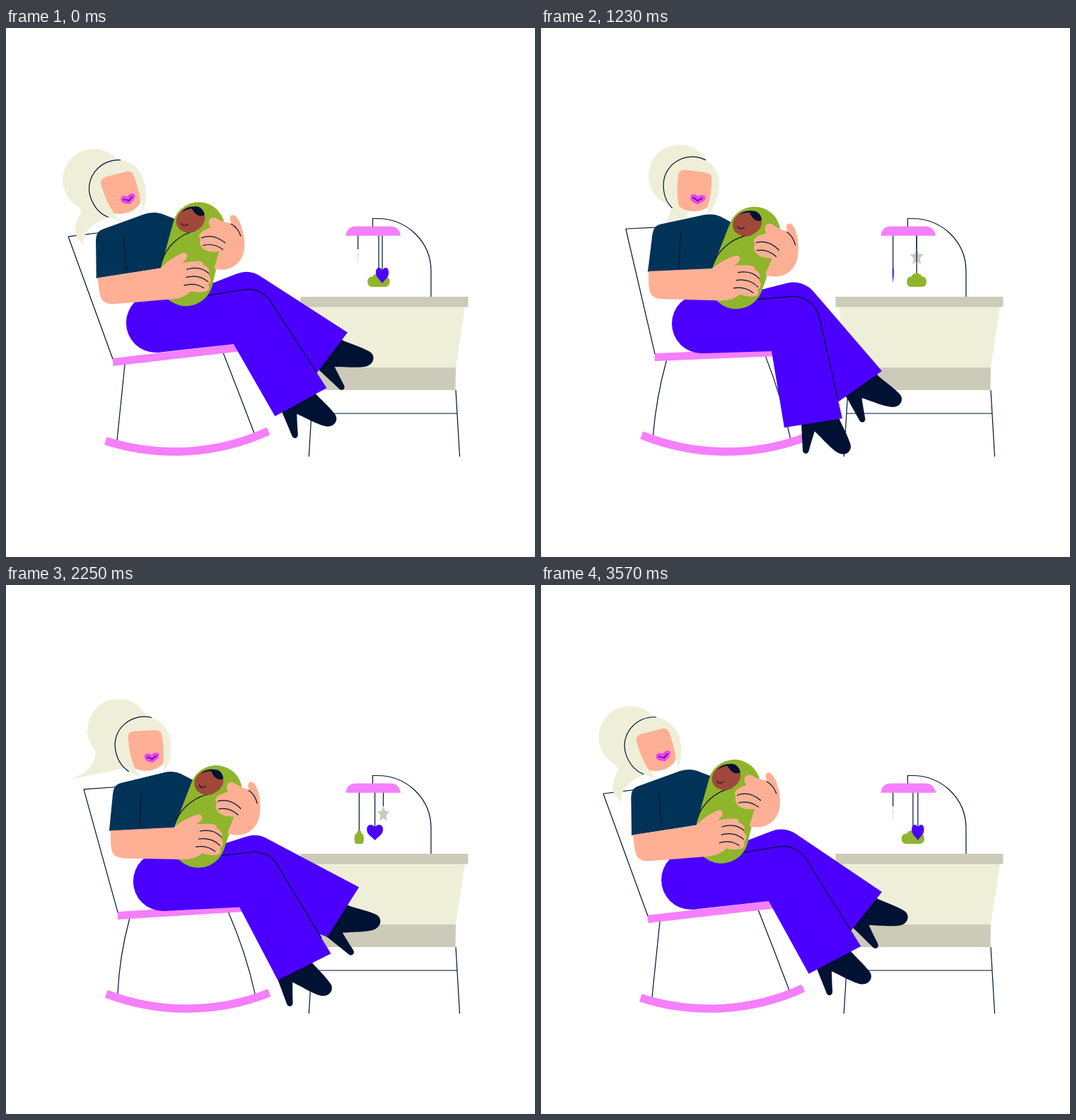
Write an HTML page with a canvas that moves like this. It is 748x748 px and loops after 3600 ms.

```html
<!DOCTYPE html>
<html lang="en">
<head>
<meta charset="utf-8">
<title>Rocking chair</title>
<style>
  html, body { margin: 0; width: 100%; height: 100%; overflow: hidden; background: #fff; }
  canvas { display: block; }
</style>
</head>
<body>
<canvas id="stage" width="748" height="748"></canvas>
<script>
const ctx = document.getElementById('stage').getContext('2d');
const LOOP = 3600, ROCK = 1800, TAU = Math.PI * 2, RAD = Math.PI / 180;
const INK = '#001233', PINK = '#f57fff', VIOLET = '#4b00ff', SHIRT = '#003357', SKIN = '#ffb094',
  CREAM = '#efefd9', STONE = '#cccbb9', GREEN = '#8fb52c', BROWN = '#a0483a', LIPS = '#ee3fff';

// Periodic motion: two harmonics fitted to poses at these moments of one rock.
const MOMENTS = [0, 180, 480, 750, 1230, 1770];
const basis = t => {
  const a = t / ROCK * TAU;
  return [1, Math.cos(a), Math.sin(a), Math.cos(2 * a), Math.sin(2 * a)];
};
const ROWS = MOMENTS.map(basis);

function solve(m, v) {
  const n = v.length, a = m.map((row, i) => [...row, v[i]]);
  for (let i = 0; i < n; i++) {
    const pivot = a[i][i];
    a[i] = a[i].map(x => x / pivot);
    for (let j = 0; j < n; j++) {
      if (j === i) continue;
      const f = a[j][i];
      a[j] = a[j].map((x, k) => x - f * a[i][k]);
    }
  }
  return a.map(row => row[n]);
}

function wave(values) {
  const s = MOMENTS.map((_, i) => values[i] ?? values[0]);
  const dot = (p, q) => ROWS.reduce((sum, r, i) => sum + p(r, i) * q(r, i), 0);
  const normal = ROWS[0].map((_, i) => ROWS[0].map((_, j) =>
    dot(r => r[i], r => r[j]) + (i === j && i > 2 ? 0.15 : 0)));
  const c = solve(normal, ROWS[0].map((_, i) => dot(r => r[i], (_, k) => s[k])));
  return t => basis(t).reduce((sum, b, i) => sum + b * c[i], 0);
}

function point(xs, ys) {
  const x = wave(xs), y = wave(ys);
  return t => [x(t), y(t)];
}

const rig = {
  backTop: point([88, 93, 112, 129, 120], [295, 294, 288, 278, 284]),
  hip: point([212, 213, 223, 231, 227], [417, 418, 419, 415, 418]),
  seatEdge: point([322, 323, 331, 332, 326], [447, 449, 456, 456, 457]),
  farKnee: point([344, 345, 356, 370, 370], [341, 342, 352, 355, 355]),
  farToe: point([483, 489, 500, 502, 482, 482], [431, 418, 430, 455, 485, 434]),
  farHeel: point([440, 445, 455, 447, 421, 439], [487, 488, 499, 517, 528, 488]),
  nearThigh: point([281, 281, 303, 313, 303], [379, 380, 383, 382, 384]),
  nearKnee: point([361, 360, 373, 389, 386], [366, 368, 376, 378, 377]),
  nearToe: point([454, 458, 459, 444, 426, 452], [509, 505, 524, 545, 552, 511]),
  nearHeel: point([381, 387, 383, 363, 344, 378], [549, 549, 560, 565, 565, 550]),
  nearSlide: wave([-12, -22, -24, -17, 0]),
  farSlide: wave([-14, -17, -26, -25, -8]),
  sleeve: point([128, 130, 148, 160, 151], [354, 353, 347, 337, 345]),
  shirtTurn: wave([-6.8, -5, 0, 2.3, 1]),
  arm: point([128, 129, 148, 159, 150], [354, 353.5, 347, 337.5, 344.5]),
  armTurn: wave([-6.3, -6.3, 0, 1.9, -0.3]),
  head: point([164, 169, 203, 229, 217], [232, 232, 232, 222, 229]),
  headTurn: wave([-20, -18.5, -8, 0, 2.5]),
  bun: point([125, 126, 164, 200, 196], [215, 212, 204, 195, 209]),
  tailRoot: point([108, 101, 131, 166, 184], [262, 252, 238, 232, 258]),
  tailOuter: point([90, 82, 131, 156, 178], [289, 280, 262, 250, 272]),
  tailTip: point([112, 92, 92, 135, 177], [307, 302, 271, 235, 280]),
  tailInner: point([108, 96, 125, 140, 183], [278, 278, 268, 258, 276]),
  tailEnd: point([160, 148, 172, 200, 205], [263, 266, 257, 250, 268])
};

function fill(color, shape) {
  ctx.fillStyle = color;
  ctx.fill(typeof shape === 'string' ? new Path2D(shape) : shape);
}

function stroke(shape, color = INK, width = 1.2) {
  ctx.strokeStyle = color;
  ctx.lineWidth = width;
  ctx.stroke(typeof shape === 'string' ? new Path2D(shape) : shape);
}

function group(draw) {
  ctx.save();
  draw();
  ctx.restore();
}

// Turns about the pivot and moves the pivot to the given place.
function place([x, y], degrees, [px, py]) {
  ctx.translate(x, y);
  ctx.rotate(degrees * RAD);
  ctx.translate(-px, -py);
}

function drawCrib() {
  stroke('M434 512 L428.3 606 M636 512 L641.5 606 M431.5 545 H638');
  fill(CREAM, 'M421 394 H649 L636 480 H434 Z');
  fill(STONE, 'M434 480 H636 L635.5 512 H436 Z M416.5 380 H653.5 V394.5 H416.5 Z');
  stroke('M518.5 281 V269.5 H525 C567 269.5 601 302 601 344 V380');
}

const star = 'M' + Array.from({ length: 10 }, (_, i) => {
  const r = i % 2 ? 5.8 : 12.3, a = i * Math.PI / 5;
  return `${r * Math.sin(a)} ${324 - r * Math.cos(a)}`;
}).join('L') + 'Z';
const heart = 'M0 361 C-4 356 -12 353 -11.5 345 C-11 337.5 -3 337 0 343 C3 337 11 337.5 11.5 345 C12 353 4 356 0 361 Z';
const cloud = 'M-10 366 C-19 366 -20 351 -9 351.5 C-7 345 7 345 9 351.5 C20 351 19 366 10 366 Z';
const toys = [
  { shape: star, color: STONE, phase: -88, string: 313 },
  { shape: heart, color: VIOLET, phase: 142, string: 343 },
  { shape: cloud, color: GREEN, phase: 22, string: 349 }
];

function drawMobile(t) {
  const hung = toys.map(toy => ({ ...toy, angle: (toy.phase + t / LOOP * 360) * RAD }));
  hung.sort((a, b) => Math.cos(b.angle) - Math.cos(a.angle));
  for (const { shape, color, string, angle } of hung) group(() => {
    ctx.translate(519 + 21.3 * Math.sin(angle), 0);
    stroke(`M0 293 V${string}`);
    ctx.scale(Math.max(0.06, Math.abs(Math.cos(angle))), 1);
    fill(color, shape);
  });
  fill(PINK, 'M480.5 293.7 C481 286 486 280.5 494 280.5 H544 C552 280.5 557 286 558 293.7 Z');
}

function drawChair(t) {
  const s = 0.5 - 0.5 * Math.cos(t / ROCK * TAU);
  const turn = 6.1 * s, radius = 318, bend = 24 * s * (1 - s);
  const hub = [238 + radius * turn * RAD, 281];
  const a = (turn - 7) * RAD, [x, y] = rig.backTop(t);
  stroke(`M${x + 55 * Math.cos(a)} ${y + 55 * Math.sin(a)} L${x} ${y}`);
  group(() => {
    place(hub, turn, [238, 281]);
    stroke(`M168 476 Q${162.5 - bend} 529 157 583 M307 459 Q${329 + bend} 515 351 573`);
    stroke('M151 472.5 L328 452', PINK, 11);
    const rocker = new Path2D();
    rocker.arc(238, 281, radius, 65.3 * RAD, 107.8 * RAD);
    stroke(rocker, PINK, 11.5);
    const back = new DOMPoint(x, y).matrixTransform(ctx.getTransform().inverse());
    stroke(`M${back.x} ${back.y} L151 468`);
  });
}

const foot = 'M-17 -1 L-21 37 C-20 42.5 -14 42.5 -12 37 C-8 28 -4 20 0 12 C8 22 20 42 29 48 C39 54 49 47 47 37 C45 24 39 8 37 -1 Z';

function drawFoot(toe, heel, slide, drop) {
  group(() => {
    ctx.translate((toe[0] + heel[0]) / 2, (toe[1] + heel[1]) / 2);
    ctx.rotate(Math.atan2(toe[1] - heel[1], toe[0] - heel[0]));
    ctx.translate(slide, drop);
    fill(INK, foot);
    ctx.fillRect(-17, -6, 54, 6);
  });
}

function drawLegs(t) {
  const [hx, hy] = rig.hip(t), edge = rig.seatEdge(t);
  const farKnee = rig.farKnee(t), farToe = rig.farToe(t), farHeel = rig.farHeel(t);
  const thigh = rig.nearThigh(t), knee = rig.nearKnee(t), toe = rig.nearToe(t), heel = rig.nearHeel(t);

  drawFoot(farToe, farHeel, rig.farSlide(t), 3);
  const far = new Path2D();
  far.moveTo(hx + 10, hy - 29);
  far.arcTo(...farKnee, ...farToe, 37);
  for (const p of [farToe, farHeel, edge, [hx, hy]]) far.lineTo(...p);
  fill(VIOLET, far);

  drawFoot(toe, heel, rig.nearSlide(t), 0);
  const near = new Path2D();
  near.moveTo(hx, hy);
  near.lineTo(...thigh);
  near.arcTo(...knee, ...toe, 37);
  for (const p of [toe, heel, edge, [hx + 2, hy + 42]]) near.lineTo(...p);
  fill(VIOLET, near);
  const seat = new Path2D();
  seat.arc(hx, hy, 42, 0, TAU);
  fill(VIOLET, seat);

  const crease = new Path2D();
  crease.moveTo(...thigh);
  crease.arcTo(...knee, ...toe, 37);
  crease.lineTo(...knee.map((k, i) => k + 0.85 * (toe[i] - k)));
  stroke(crease);
}

function drawPonytail(t) {
  const [x, y] = rig.bun(t), root = rig.tailRoot(t), r = 44;
  const hair = new Path2D();
  hair.arc(x, y, r, 0, TAU);
  fill(CREAM, hair);
  const tail = new Path2D();
  tail.moveTo(x, y);
  tail.lineTo(x - r, y);
  tail.bezierCurveTo(x - r, y + 22, root[0], root[1] - 14, ...root);
  tail.quadraticCurveTo(...rig.tailOuter(t), ...rig.tailTip(t));
  tail.quadraticCurveTo(...rig.tailInner(t), ...rig.tailEnd(t));
  tail.lineTo(...rig.head(t));
  fill(CREAM, tail);
}

function drawHead(t) {
  place(rig.head(t), rig.headTurn(t), [229, 222]);
  fill(CREAM, 'M215 260 C200 253 185 235 185 214 C185 190 204 175 225 175 C249 175 265 194 264 217 C263 238 255 250 246 258 C249 252 251 246 251 238 L208 240 C208 248 210 255 215 260 Z');
  fill(SKIN, 'M205 206 C205 197 208 194 215 194 L244 197 C251 198 253 201 253 207 C253 220 252 234 249 245 C242 252 224 257 208 246 C205 233 204 218 205 206 Z');
  stroke('M243 179 C216 167 185 186 185 215 C185 230 190 241 199 249');
  fill(LIPS, 'M224 232 C225 227 231 227 234 231 C238 228 244 228 245 232 C245 237 238 240 234 242 C230 240 223 238 224 232 Z');
  stroke('M227 233 Q231 234 234 237 L241 233');
}

function drawShirt(t) {
  place(rig.sleeve(t), rig.shirtTurn(t), [148, 347]);
  fill(SHIRT, 'M148 347 L153 300 C154 286 157 281 166 279 L226 265 C236 263 243 264 250 267 L290 288 L250 343 Z');
  stroke('M194 290 Q192 310 192 341');
}

function drawBaby() {
  const axis = Math.atan2(69, -26), wrap = new Path2D();
  wrap.arc(300, 293, 37, axis + Math.PI / 2, axis + Math.PI * 1.5);
  wrap.arc(274, 362, 38.5, axis - Math.PI / 2, axis + Math.PI / 2);
  fill(GREEN, wrap);
  stroke('M295 296 C272 298 252 314 243 333');
  const face = new Path2D();
  face.ellipse(290, 279.5, 21, 17.5, -0.35, 0, TAU);
  fill(BROWN, face);
  fill(INK, 'M293 263 C301 259 310 265 310.5 275 C303 279 296 272 293 263 Z M278 268 Q285 261 296 261.5 L293 264 Q286 264 278 268 Z');
  stroke('M276 283 Q279 290 286 285');
}

function drawArms(t) {
  place(rig.arm(t), rig.armTurn(t), [148, 347]);
  drawBaby();
  fill(SKIN, 'M347 291 C342 281 349 277 354 282 C360 290 363 306 362 320 C361 342 347 355 330 355 C323 355 319 354 315 352 L325 329 C317 329 307 327 303 322 C299 318 298 312 301 309 C296 303 302 297 317 294 C312 284 318 278 325 281 C334 287 341 290 347 291 Z');
  stroke('M302 307 Q320 302 335 318 M303 318 Q318 315 331 327 M346 292 Q355 298 358 311');
  fill(SKIN, 'M150 346.5 C150 360 150 366 151 372 C152 382 160 385.5 170 386 L240 388 C256 389 268 389 279 380 C287 383 297 384 302 382 C306 380 306 376 304 373 C310 371 310 364 306 360 C310 354 307 348 300 345 C303 339 293 338 271 339 C281 334 282 326 275 325 C262 328 250 335 240 343 Z');
  stroke('M276 349 Q296 345 307 358 M274 360 Q293 357 305 370 M270 371 Q286 368 298 378');
}

function draw(t) {
  const rock = t % ROCK;
  ctx.fillStyle = '#fff';
  ctx.fillRect(0, 0, 748, 748);
  drawCrib();
  drawMobile(t);
  drawChair(rock);
  drawLegs(rock);
  drawPonytail(rock);
  for (const part of [drawHead, drawShirt, drawArms]) group(() => part(rock));
}

const start = performance.now();
function tick() {
  draw((performance.now() - start) % LOOP);
  requestAnimationFrame(tick);
}
tick();
</script>
</body>
</html>
```
